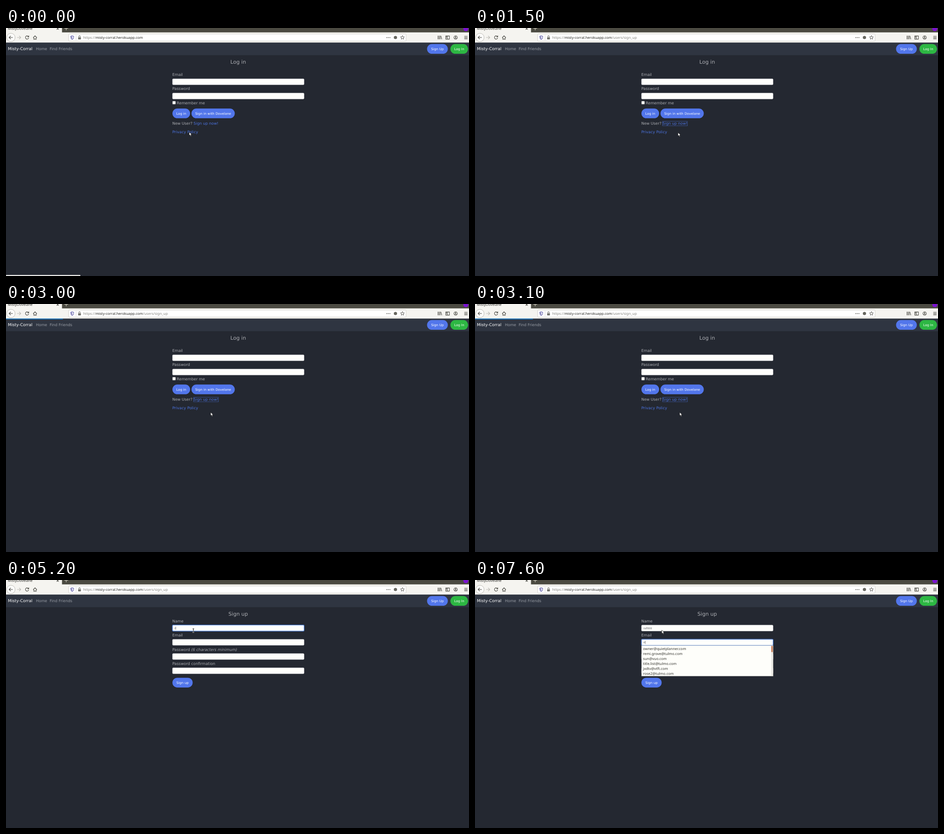
Animation of 1021x549 px, one loop 8 s. Source, as an HTML page:

```html
<!DOCTYPE html>
<html lang="en">
<head>
<meta charset="utf-8">
<title>Sign up walkthrough</title>
<style>
  html, body { margin: 0; width: 100%; height: 100%; overflow: hidden; background: #242831; }
  svg { display: block; width: 100vw; height: 100vh; }
  text { white-space: pre; text-rendering: geometricPrecision; font: 8.4px "DejaVu Sans", sans-serif; fill: #acaeb3; }
  .title { font-size: 11.4px; text-anchor: middle; }
  .brand { font-size: 9px; fill: #fff; }
  .nav { fill: #999da5; }
  .btn { font-size: 7.25px; fill: #fff; text-anchor: middle; }
  .link { fill: #4c74e2; }
  .link.hover { fill: #3a61cf; text-decoration: underline; }
  .ui { font: 7.9px "Noto Sans", "Open Sans", sans-serif; fill: #33332f; }
  .dim { fill: #84847f; }
  .typed { font: 7.5px "Liberation Serif", serif; fill: #55585e; }
  .icon { fill: none; stroke: #45453f; stroke-width: 1.1; }
</style>
</head>
<body>
<svg id="stage" viewBox="0 0 1021 549" preserveAspectRatio="none"></svg>
<script>
const NS = "http://www.w3.org/2000/svg";
const LOOP = 8000, STEP = 100, LEFT = 366.7;
const stage = document.getElementById("stage");

function add(parent, tag, attrs, content) {
  const el = document.createElementNS(NS, tag);
  for (const key in attrs) el.setAttribute(key, attrs[key]);
  if (content) el.textContent = content;
  parent.appendChild(el);
  return el;
}
const group = (parent = stage) => add(parent, "g", {});
const rect = (p, x, y, width, height, fill, more) => add(p, "rect", { x, y, width, height, fill, ...more });
const text = (p, x, y, cls, content) => add(p, "text", { x, y, class: cls }, content);
const icon = (p, d, more) => add(p, "path", { d, class: "icon", ...more });
const show = (el, on) => el.setAttribute("visibility", on ? "inherit" : "hidden");

function button(p, x, y, width, label, fill = "#5276eb") {
  rect(p, x, y, width, 21.5, fill, { rx: 10.75 });
  text(p, x + width / 2, y + 13.3, "btn", label);
}
function field(p, y) {
  return rect(p, 367.1, y, 290.2, 13.3, "#fffffc", { rx: 1.8, stroke: "#c9ccd2", "stroke-width": 0.6 });
}
const ring = (p, y) => rect(p, 367, y, 290.4, 13.5, "none", { rx: 1.8, stroke: "#4479d6", "stroke-width": 1.3 });
const caret = (p, y) => rect(p, 371.8, y, 0.7, 6.8, "#55565a");

function drawBrowser() {
  const g = group();
  rect(g, 0, 0, 1021, 10, "#4b4a41");
  rect(g, 0, 0, 123.5, 10, "#f5f4f0");
  text(g, 4, 4, "ui", "MistyDovelane");
  icon(g, "M111.7 -1L116.2 3.5M116.2 -1L111.7 3.5");
  icon(g, "M128.5 0.8H137M132.7 -3V5", { style: "stroke:#d6d4c8" });
  add(g, "circle", { cx: 1014, cy: 1.5, r: 5.5, fill: "#7a12cf" });
  rect(g, 0, 9.7, 1021, 22.8, "#f5f4f0");
  rect(g, 138.2, 13.2, 744, 15.8, "#fff", { rx: 1.5, stroke: "#c9c7c1", "stroke-width": 0.8 });

  add(g, "circle", { cx: 10.8, cy: 21, r: 9.3, fill: "#fcfcfa", stroke: "#aaa9a3", "stroke-width": 0.8 });
  icon(g, "M15 21H7M10.5 17.3L6.8 21L10.5 24.7");
  icon(g, "M24.5 21H32.5M29 17.3L32.7 21L29 24.7", { style: "stroke:#b9b8b2" });
  icon(g, "M49.4 18.8A3.6 3.6 0 1 0 50 22M50.2 16.8V19.6H47.2");
  icon(g, "M59.8 21.3L64 17.3L68.2 21.3M61.2 20.8V25H66.8V20.8M64 25V22.5");
  icon(g, "M146 17.2L149.3 18.4Q149.3 23.6 146 25.2Q142.7 23.6 142.7 18.4Z", { style: "stroke:#4f4c9e" });
  add(g, "path", { d: "M146 18.9V23.6Q144.3 22.4 144.2 19.5Z", fill: "#4f4c9e" });
  rect(g, 154.2, 15, 0.7, 12, "#c9c8c4");
  rect(g, 159, 20.4, 6.2, 4.8, "#74746e", { rx: 0.8 });
  icon(g, "M160.4 20.6V18.8A1.7 1.7 0 0 1 163.8 18.8V20.6", { style: "stroke:#74746e" });
  for (const x of [839.8, 843.2, 846.6]) add(g, "circle", { cx: x, cy: 21.2, r: 1, fill: "#55554f" });
  add(g, "circle", { cx: 858.8, cy: 21, r: 3.6, fill: "#66665f" });
  let star = "";
  for (let i = 0; i < 10; i++) {
    const a = i * Math.PI / 5, r = i % 2 ? 2.1 : 4.5;
    star += (i ? "L" : "M") + (874.2 + r * Math.sin(a)) + " " + (21.2 - r * Math.cos(a));
  }
  icon(g, star + "Z", { style: "stroke-width:0.9" });
  icon(g, "M952.6 17V25M955 17V25M957.4 17V25M959 17.3L961 25");
  icon(g, "M969.8 17.6H977.8V24.6H969.8ZM973.2 17.6V24.6M970.8 19.4H972.2M970.8 21.2H972.2");
  add(g, "circle", { cx: 991.6, cy: 21, r: 3.8, class: "icon" });
  add(g, "circle", { cx: 991.6, cy: 20, r: 1.4, fill: "#45453f" });
  icon(g, "M989.2 23.6Q991.6 21.4 994 23.6");
  icon(g, "M1010.6 18.3H1017.8M1010.6 21.1H1017.8M1010.6 23.9H1017.8");

  const url = text(g, 170.2, 24, "ui dim", "https://");
  add(url, "tspan", { fill: "#262622", style: "fill:#262622" }, "misty-corral.herokuapp.com");
  const path = add(url, "tspan", {}, "/users/sign_up");

  rect(g, 0, 32.5, 1021, 27.7, "#2f3541");
  text(g, 4.3, 49.3, "brand", "Misty-Corral");
  text(g, 66, 49.2, "nav", "Home");
  text(g, 96.2, 49.2, "nav", "Find Friends");
  button(g, 928.5, 35.6, 45.8, "Sign Up");
  button(g, 980, 35.6, 39, "Log In", "#2db743");
  return path;
}

function drawLogin() {
  const g = group();
  text(g, 512, 79.4, "title", "Log in");
  text(g, LEFT, 105.7, "", "Email");
  field(g, 112.4);
  text(g, LEFT, 137.2, "", "Password");
  field(g, 143.9);
  rect(g, 367.2, 161.9, 6.8, 6.8, "#f7f7f4", { rx: 1, stroke: "#8e9096", "stroke-width": 0.6 });
  text(g, 376.6, 168.7, "", "Remember me");
  button(g, 367, 178.3, 39, "Log in");
  button(g, 409, 178.3, 95.5, "Sign in with Dovelane");
  text(g, LEFT, 214.1, "", "New User?");
  const signup = text(g, 413.6, 214.1, "link", "Sign up now!");
  const privacy = text(g, LEFT, 232.5, "link", "Privacy Policy");
  const outline = rect(g, 413.5, 206.5, 55, 10, "none", { stroke: "#4c74e2", "stroke-width": 0.8, "stroke-dasharray": "1 0.6" });
  return { g, signup, privacy, outline };
}

function drawSignup() {
  const g = group();
  text(g, 512, 79.4, "title", "Sign up");
  ["Name", "Email", "Password ", "Password confirmation"].forEach((label, i) => {
    const el = text(g, LEFT, 93.7 + i * 31.5, "", label);
    if (i === 2) add(el, "tspan", { "font-style": "italic" }, "(6 characters minimum)");
    field(g, 99.8 + i * 31.5);
  });
  button(g, 367, 216.4, 44.6, "Sign up");
  const rings = [ring(g, 99.7), ring(g, 131.2)];
  const inputs = [text(g, 371.6, 108.6, "typed", ""), text(g, 371.6, 140.1, "typed", "")];
  const carets = [caret(g, 103.1), caret(g, 134.7)];

  const list = group(g);
  rect(list, 367.2, 145, 290.1, 67.8, "#fefefa", { stroke: "#b9b9b3", "stroke-width": 0.6 });
  ["owner@quietplanner.com", "remi.grove@tulmo.com", "sun@vuo.com",
   "title.list@tulmo.com", "jxdtv@vtft.com", "rose2@tulmo.com"]
    .forEach((mail, i) => text(list, 370.4, 154.6 + i * 11.08, "ui", mail));
  rect(list, 653, 145.4, 4, 67, "#ecebe6");
  rect(list, 653.4, 146, 3.2, 13.6, "#c97b55", { rx: 0.6 });
  return { g, rings, inputs, carets, list };
}

function drawPointers() {
  const outlined = { stroke: "#111", "stroke-width": 0.7, "stroke-linejoin": "round", fill: "#fff" };
  const arrow = add(stage, "path", { d: "M0 0V7.6L1.8 6L3.1 9L4.6 8.4L3.3 5.5H5.8Z", ...outlined });
  const hand = add(stage, "path", {
    d: "M-.8 .4Q0 -.4 .8 .4V3L3.8 3.6Q4.6 4 4.4 5.4L3.8 8.4H-.6L-2.8 5.2Q-2.6 4 -.8 5Z", ...outlined });
  const beam = group();
  const d = "M-1.8 -4H1.8M0 -4V4M-1.8 4H1.8";
  add(beam, "path", { d, stroke: "#fff", "stroke-width": 1.8, fill: "none" });
  add(beam, "path", { d, stroke: "#111", "stroke-width": 1, fill: "none" });
  return { arrow, hand, beam };
}

const path = drawBrowser();
const login = drawLogin();
const signup = drawSignup();
const bar = rect(stage, 0, 32.4, 0, 1.7, "#197fd0");
const status = rect(stage, 0, 546.8, 164, 4, "#f3f3ef", { rx: 1 });
const pointers = drawPointers();

// Held values: each entry starts at its time.
const at = (keys, t) => keys.filter(k => k[0] <= t).pop();
const moves = [
  [0, 404, 230.5, "arrow"], [100, 404.5, 230.7, "hand"], [200, 406, 230.5, "hand"],
  [400, 411, 224, "arrow"], [500, 418, 217, "hand"], [600, 424, 211.5, "hand"],
  [1100, 425, 212, "hand"], [1300, 426, 213, "arrow"], [1500, 447.7, 231.5, "arrow"],
  [1700, 450, 236, "arrow"], [1900, 451.2, 239.7, "arrow"],
  [3800, 444, 214, "arrow"], [3900, 431, 168, "arrow"], [4000, 421.8, 136.7, "arrow"],
  [4200, 415.5, 119, "arrow"], [4300, 413.2, 112, "beam"], [7300, 411.8, 111, "arrow"]
];
const typing = [[0, 0], [5200, 1], [5500, 2], [5600, 4], [5700, 5], [6400, 6], [6700, 8]];
const WORD = "rafttttt";

// Piecewise linear value through [time, value] points.
function ramp(points, t) {
  if (t <= points[0][0]) return points[0][1];
  for (let i = 1; i < points.length; i++) {
    const [t0, v0] = points[i - 1], [t1, v1] = points[i];
    if (t <= t1) return v0 + (v1 - v0) * (t - t0) / (t1 - t0);
  }
  return points[points.length - 1][1];
}
const progress = [[1500, 0], [1800, 102], [2300, 111], [3000, 125.5], [3200, 130], [3400, 941]];

function placeCaret(i, on) {
  show(signup.carets[i], on);
  const input = signup.inputs[i];
  const width = input.textContent ? input.getComputedTextLength() : 0;
  signup.carets[i].setAttribute("x", 371.8 + width);
}

function render(now) {
  const t = Math.floor(now % LOOP / STEP) * STEP;
  const within = (a, b) => t >= a && t < b;

  show(path, t >= 1100);
  show(login.g, t < 3200);
  show(signup.g, t >= 3200);
  login.privacy.classList.toggle("hover", within(100, 400));
  login.signup.classList.toggle("hover", within(500, 1500));
  show(login.outline, t >= 900);

  show(status, t < 1200);
  status.setAttribute("width", t < 500 ? 164 : 190);
  bar.setAttribute("width", ramp(progress, t));
  bar.setAttribute("opacity", t < 3400 ? 1 : 0.5);
  show(bar, within(1600, 3500));

  signup.inputs[0].textContent = WORD.slice(0, at(typing, t)[1]);
  signup.inputs[1].textContent = t >= 7600 ? "e" : "";
  placeCaret(0, within(3200, 4300) || within(5200, 7000));
  placeCaret(1, t >= 7100);
  signup.rings[0].setAttribute("opacity", ramp([[3200, 0], [3400, 1], [7000, 1], [7100, 0.75], [7200, 0]], t));
  signup.rings[1].setAttribute("opacity", ramp([[7100, 0], [7300, 1]], t));
  show(signup.list, t >= 7300);

  const [, x, y, kind] = at(moves, t);
  for (const name in pointers) {
    show(pointers[name], name === kind);
    pointers[name].setAttribute("transform", `translate(${x} ${y})`);
  }
}

function tick() {
  render(performance.now());
  requestAnimationFrame(tick);
}
tick();
</script>
</body>
</html>
```
